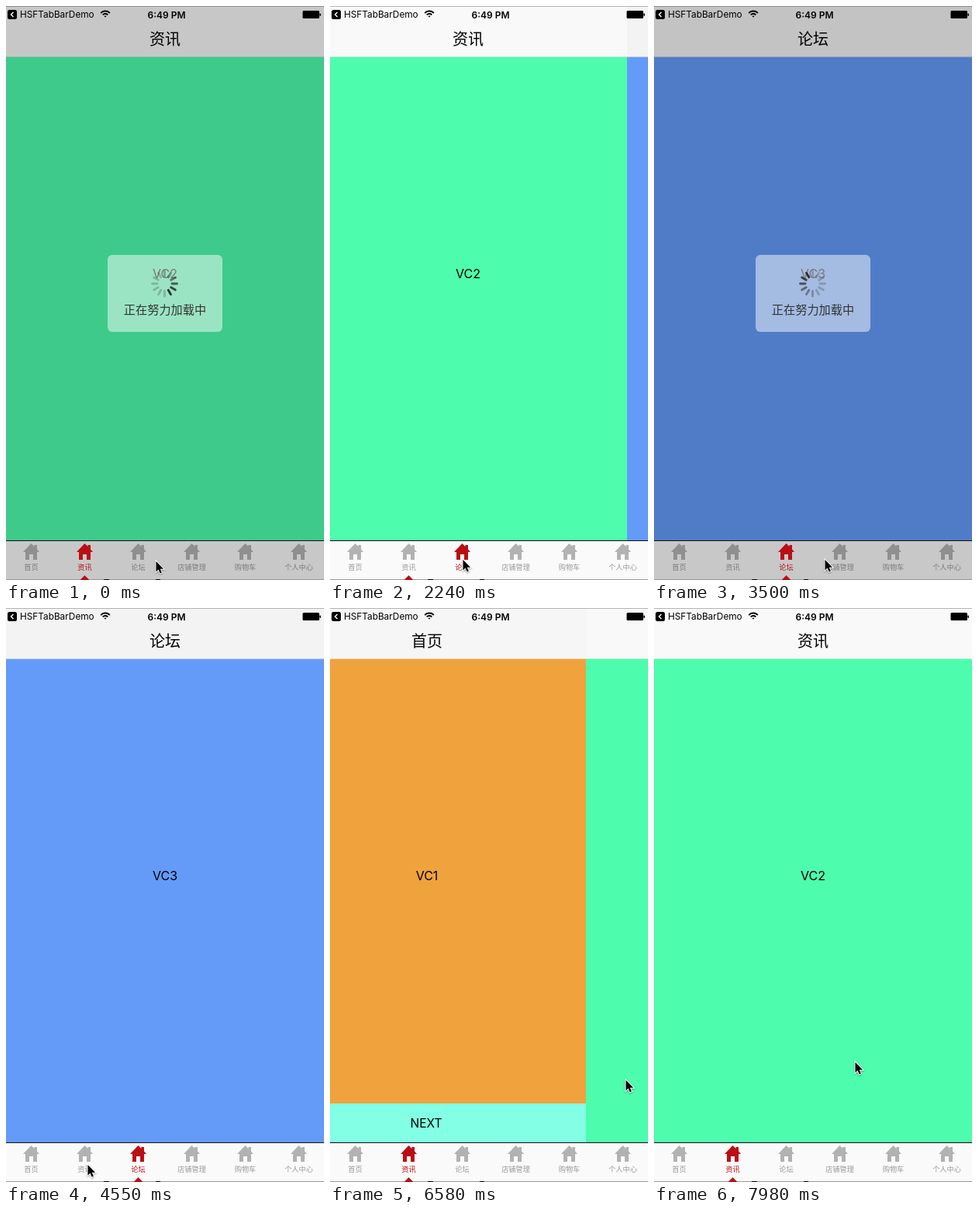
An HTML page with a canvas that plays this animation: 410x738 px, repeating every 8 s.

```html
<!DOCTYPE html>
<html lang="zh-CN">
<head>
<meta charset="utf-8">
<style>
html, body { margin: 0; width: 100%; height: 100%; overflow: hidden; background: #f8f8f8; }
canvas { display: block; width: 410px; height: 738px; }
</style>
</head>
<body>
<canvas id="stage"></canvas>
<script>
const W = 410, H = 738, LOOP = 8000;
const LATIN = 'Inter, sans-serif';
const CJK = '"Noto Sans CJK SC", "Noto Sans CJK", sans-serif';
const RED = '#b90f14';

const PAGES = [
  { title: '首页', label: 'VC1', color: '#f0a23c', bar: '#f6f6f6', next: true },
  { title: '资讯', label: 'VC2', color: '#4dfcad', bar: '#f9f9f9' },
  { title: '论坛', label: 'VC3', color: '#649bf8', bar: '#f3f3f3' }
];
const TABS = ['首页', '资讯', '论坛', '店铺管理', '购物车', '个人中心'];

// A tab tap selects at once, a swipe selects when the page has settled.
const START_PAGE = 1, SETTLE = 60;
const TURNS = [
  { start: 2194, end: 2495, page: 2, tap: true },
  { start: 5150, end: 5500, page: 1 },
  { start: 6250, end: 6712, page: 0 },
  { start: 7080, end: 7480, page: 1 }
];

const CURSOR_HOME = { x: 193, y: 714 };
const CURSOR_MOVES = [
  { start: 1300, end: 1900, x: 171, y: 712 },
  { start: 2700, end: 3400, x: 220, y: 712 },
  { start: 4150, end: 4550, x: 105, y: 716 },
  { start: 4850, end: 5130, x: 50, y: 640 },
  { start: 5150, end: 5430, x: 425, y: 612 },
  { start: 5800, end: 6200, x: 52, y: 619 },
  { start: 6250, end: 6560, x: 381, y: 607 },
  { start: 7080, end: 7280, x: 259, y: 584 }
];

// Each page shows the loader once, on its first visit.
const LOADS = [-520, 2520], LOAD_TIME = 1770, FADE = 180;

const canvas = document.getElementById('stage');
const ctx = canvas.getContext('2d');
const ratio = window.devicePixelRatio || 1;
canvas.width = W * ratio;
canvas.height = H * ratio;

const clamp = v => Math.min(1, Math.max(0, v));
const smooth = u => u * u * (3 - 2 * u);

const follow = (moves, key, from, t) => moves.reduce(
  (v, m) => v + (m[key] - v) * smooth(clamp((t - m.start) / (m.end - m.start))), from);

const pageAfter = (t, changeTime) => TURNS.reduce(
  (page, turn) => t >= changeTime(turn) ? turn.page : page, START_PAGE);

const loaderAlpha = t => LOADS.reduce((sum, start) =>
  sum + clamp((t - start) / FADE) - clamp((t - start - LOAD_TIME) / FADE), 0);

function rect(x, y, w, h, color, radius = 0) {
  ctx.fillStyle = color;
  ctx.beginPath();
  ctx.roundRect(x, y, w, h, radius);
  ctx.fill();
}

function text(str, x, y, size, color = '#000', family = LATIN, align = 'center', weight = 400) {
  ctx.font = `${weight} ${size}px ${family}`;
  ctx.textAlign = align;
  ctx.fillStyle = color;
  ctx.fillText(str, x, y);
}

function drawPage(page, x) {
  const mid = x + W / 2;
  rect(x, 0, W, 65, page.bar);
  rect(x, 65, W, 622, page.color);
  text(page.title, mid, 49.5, 20, '#000', CJK);
  text(page.label, mid, 350, 16);
  if (page.next) {
    rect(x, 637, W, 50, '#82ffe4');
    text('NEXT', mid - 1, 668, 15.5);
  }
}

const HOUSE = new Path2D(
  'M0 0L4 4V2H7.5V7.5L10.5 11H7.5V21H2.5V14H-2.5V21H-7.5V11H-10.5Z');
const MARKER = new Path2D('M0 0L6 6H-6Z');
const ARROW = new Path2D('M0 0V13.5L3 10.6L5.2 15.5L7.4 14.5L5.3 9.8H9.6Z');

function shape(path, x, y, color, outline) {
  ctx.save();
  ctx.translate(x, y);
  if (outline) {
    ctx.shadowColor = 'rgba(0,0,0,.35)';
    ctx.shadowBlur = 2 * ratio;
    ctx.shadowOffsetY = ratio;
    ctx.lineWidth = 2;
    ctx.strokeStyle = outline;
    ctx.stroke(path);
    ctx.shadowColor = 'transparent';
  }
  ctx.fillStyle = color;
  ctx.fill(path);
  ctx.restore();
}

const tabX = i => 32.5 + 69 * i;

function drawTab(i, iconColor, textColor) {
  shape(HOUSE, tabX(i), 691, iconColor);
  text(TABS[i], tabX(i), 725.4, 9.2, textColor, CJK);
}

function drawStatusBar() {
  rect(2, 5, 12, 12, '#000', 2.5);
  ctx.strokeStyle = '#fff';
  ctx.lineWidth = 1.5;
  ctx.stroke(new Path2D('M9.5 8L6.5 11L9.5 14'));
  text('HSFTabBarDemo', 18, 15.2, 11.8, '#000', LATIN, 'left');
  text('6:49 PM', 207, 15.7, 12, '#000', LATIN, 'center', 600);

  ctx.strokeStyle = '#000';
  ctx.lineWidth = 1.8;
  for (let ring = 0; ring < 3; ring++) {
    ctx.beginPath();
    ctx.arc(128, 14.5, 1 + 3.5 * ring, -Math.PI * 0.76, -Math.PI * 0.24);
    ctx.stroke();
  }
  rect(382.5, 6, 21.5, 10, '#000', 1.5);
  rect(404.5, 9.5, 1.5, 3.5, '#000', 0.7);
}

function drawLoader(t, alpha) {
  ctx.save();
  ctx.globalAlpha = alpha;
  rect(131, 320, 148, 99, 'rgba(255,255,255,.48)', 6);
  text('正在努力加载中', 205, 395.6, 15.2, '#333', CJK);

  const head = 5 + Math.floor(t * 12 / 1000);
  ctx.lineWidth = 2.8;
  ctx.lineCap = 'round';
  ctx.strokeStyle = '#2b2b2b';
  ctx.translate(204.5, 357);
  ctx.rotate(head * Math.PI / 6);
  for (let age = 0; age < 12; age++) {
    ctx.globalAlpha = alpha * Math.max(0.25, 1 - age * 0.13);
    ctx.stroke(new Path2D('M0 -9.5V-16'));
    ctx.rotate(-Math.PI / 6);
  }
  ctx.restore();
}

function draw(t) {
  ctx.setTransform(ratio, 0, 0, ratio, 0, 0);
  const scroll = W * follow(TURNS, 'page', START_PAGE, t);
  const selected = pageAfter(t, turn => turn.tap ? turn.start : turn.end + SETTLE);
  const settled = pageAfter(t, turn => turn.end + SETTLE);
  const loading = loaderAlpha(t);

  PAGES.forEach((page, i) => {
    const x = Math.round(i * W - scroll);
    if (Math.abs(x) < W) drawPage(page, x);
  });
  rect(0, 65, W, 1, 'rgba(225,225,225,.6)');
  rect(0, 0, W, 1, '#b4b4b4');
  rect(0, 687, W, 51, '#fafafa');
  TABS.forEach((_, i) => { if (i !== selected) drawTab(i, '#b2b2b2', '#999'); });

  rect(0, 0, W, H, `rgba(0,0,0,${0.2 * loading})`);
  rect(0, 687, W, 1, '#111');
  rect(0, 737, W, 1, '#999');
  rect(126, 737, 7, 1, '#000');
  rect(193, 737, 6, 1, '#000');
  drawTab(selected, RED, RED);
  shape(MARKER, tabX(settled), 732, RED);
  drawStatusBar();
  if (loading > 0) drawLoader(t, loading);
  shape(ARROW, follow(CURSOR_MOVES, 'x', CURSOR_HOME.x, t) + 0.5,
    follow(CURSOR_MOVES, 'y', CURSOR_HOME.y, t), '#000', '#fff');
}

function tick() {
  draw(performance.now() % LOOP);
  requestAnimationFrame(tick);
}
tick();
</script>
</body>
</html>
```
